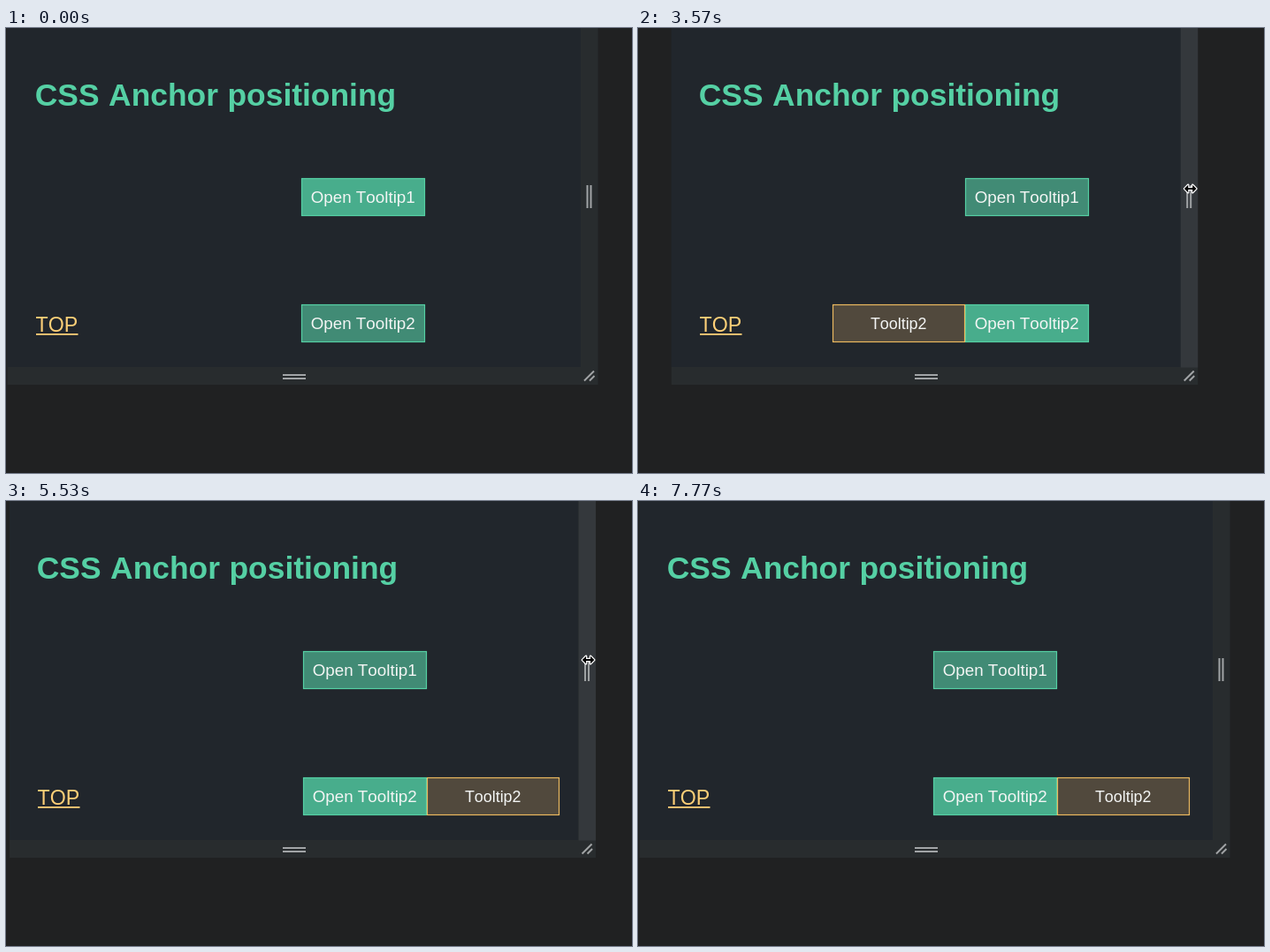
These frames come from a looping animation (708 by 504 pixels, 8.47 s). An HTML page with a canvas:

```html
<!DOCTYPE html>
<html lang="en">
<head>
<meta charset="utf-8">
<title>CSS Anchor positioning</title>
<style>
  html, body { margin: 0; width: 100%; height: 100%; overflow: hidden; background: #202122; }
  canvas { display: block; }
</style>
</head>
<body>
<canvas id="stage" width="708" height="504"></canvas>
<script>
const ctx = document.getElementById('stage').getContext('2d');
const LOOP = 8470, STEP = 70, CLICK = 1680, DRAG_START = 3080, DRAG_END = 7350;
const SANS = '"Liberation Sans", Arial, sans-serif';
const GREEN = '#55d0a4', YELLOW = '#fdcf77';

// Eased progress of a move between two times
function ease(t, start, end) {
  const u = Math.min(1, Math.max(0, (t - start) / (end - start)));
  return u * u * (3 - 2 * u);
}

// Each move starts where the one before it came to rest
function follow(value, t, moves) {
  for (const { from, until, to } of moves) value += (to - value) * ease(t, from, until);
  return value;
}

// How far both panel sides are dragged inwards
const drags = [
  { from: 3010, until: 3850, to: 49 },
  { from: 3990, until: 4900, to: -14 },
  { from: 4970, until: 6420, to: 35.5 },
  { from: 6420, until: DRAG_END, to: 0 },
];

// Pointer path: in, onto the lower button, past the handle, back to it, out
const pointerMoves = [
  { from: 560, until: 1190, x: 420, y: 307 },
  { from: 1330, until: 1540, x: 432, y: 322 },
  { from: CLICK, until: 2100, x: 669, y: 190 },
  { from: 2310, until: 2380, x: 694, y: 195 },
  { from: 2450, until: 2800, x: 661, y: 182 },
  { from: 3990, until: 4900, x: 661, y: 180 },
  { from: 7490, until: 7770, x: 479, y: 533 },
];
const along = axis => pointerMoves.map(move => ({ ...move, to: move[axis] }));
const pointerX = along('x'), pointerY = along('y');

function rect(x, y, w, h, color) {
  ctx.fillStyle = color;
  ctx.fillRect(x, y, w, h);
}

function line(x1, y1, x2, y2) {
  ctx.beginPath();
  ctx.moveTo(x1, y1);
  ctx.lineTo(x2, y2);
  ctx.stroke();
}

function label(text, x, y, font, color, align = 'left') {
  ctx.font = `${font} ${SANS}`;
  ctx.fillStyle = color;
  ctx.textAlign = align;
  ctx.fillText(text, x, y);
}

function box(x, y, w, fill, border, text, font) {
  rect(x, y, w, 43, fill);
  ctx.strokeStyle = border;
  ctx.lineWidth = 1.2;
  ctx.strokeRect(x + 0.5, y + 0.5, w - 1, 42);
  label(text, x + w / 2 - 0.3, y + 28, font, '#f3f5f4', 'center');
}

function button(x, y, text, focused) {
  box(x, y, 140, focused ? '#48ad8c' : '#418b75', GREEN, text, '18.8px');
}

function drawPanel(inset, dragging) {
  const left = 1.5 + inset, right = 669.5 - inset, bar = right - 19.5;
  rect(left, 0, right - left, 404, '#282c2e');
  rect(left, 0, bar - left, 384, '#21262c');
  if (dragging) rect(bar, 0, 19.5, 384.5, '#34383c');

  ctx.strokeStyle = '#a1a4a6';
  ctx.lineWidth = 2;
  for (const offset of [0, 4]) {
    line(right - 12 + offset, 178, right - 12 + offset, 204);
    line(313, 393 + offset, 339, 393 + offset);
  }
  line(right - 15.5, 399.5, right - 4.5, 388.5);
  line(right - 9.5, 399.5, right - 4, 394);
}

function drawContent(inset, opened) {
  const shift = Math.round(inset), x = 334 + shift;
  ctx.wordSpacing = '0.7px';
  label('CSS Anchor positioning', 32.8 + shift, 87.5, 'bold 35.4px', GREEN);
  ctx.wordSpacing = '0px';

  label('TOP', 33.6 + shift, 344, '23.2px', YELLOW);
  rect(34 + shift, 346, 47.5, 1.8, YELLOW);

  button(x, 170, 'Open Tooltip1', !opened);
  button(x, 313, 'Open Tooltip2', opened);
  if (opened) {
    const fits = x + 290 <= 650 - inset;
    box(fits ? x + 140 : x - 150, 313, 150, '#51493d', '#ecb95f', 'Tooltip2', '17.9px');
  }
}

function outlined(points, x, y) {
  ctx.beginPath();
  points.forEach(([px, py]) => ctx.lineTo(x + px, y + py));
  ctx.closePath();
  ctx.lineJoin = 'round';
  ctx.strokeStyle = '#fff';
  ctx.lineWidth = 2.4;
  ctx.stroke();
  ctx.fillStyle = '#000';
  ctx.fill();
  ctx.lineJoin = 'miter';
}

const ARROW = [[1, 1.5], [1, 15], [4, 12.2], [6.3, 17.6], [8.6, 16.6], [6.3, 11.3], [10.4, 11.3]];
const HALF = [[-6.8, 0], [-2.5, -4.3], [-2.5, -1.1], [2.5, -1.1], [2.5, -4.3]];
const RESIZE = [...HALF, ...HALF.map(([x, y]) => [-x, -y])];

function drawPointer(t, inset) {
  const x = follow(463, t, pointerX), y = follow(510, t, pointerY);
  const onHandle = x > 650 && x < 669.5 && y < 220;
  outlined(onHandle ? RESIZE : ARROW, x - inset, y);
}

function frame(now) {
  const t = Math.floor((now % LOOP) / STEP) * STEP;
  const inset = follow(0, t, drags);
  rect(0, 0, 708, 504, '#202122');
  drawPanel(inset, t >= DRAG_START && t < DRAG_END);
  drawContent(inset, t >= CLICK);
  drawPointer(t, inset);
}

ctx.fontKerning = 'none';
const start = performance.now();
function tick() {
  frame(performance.now() - start);
  requestAnimationFrame(tick);
}
tick();
</script>
</body>
</html>
```
